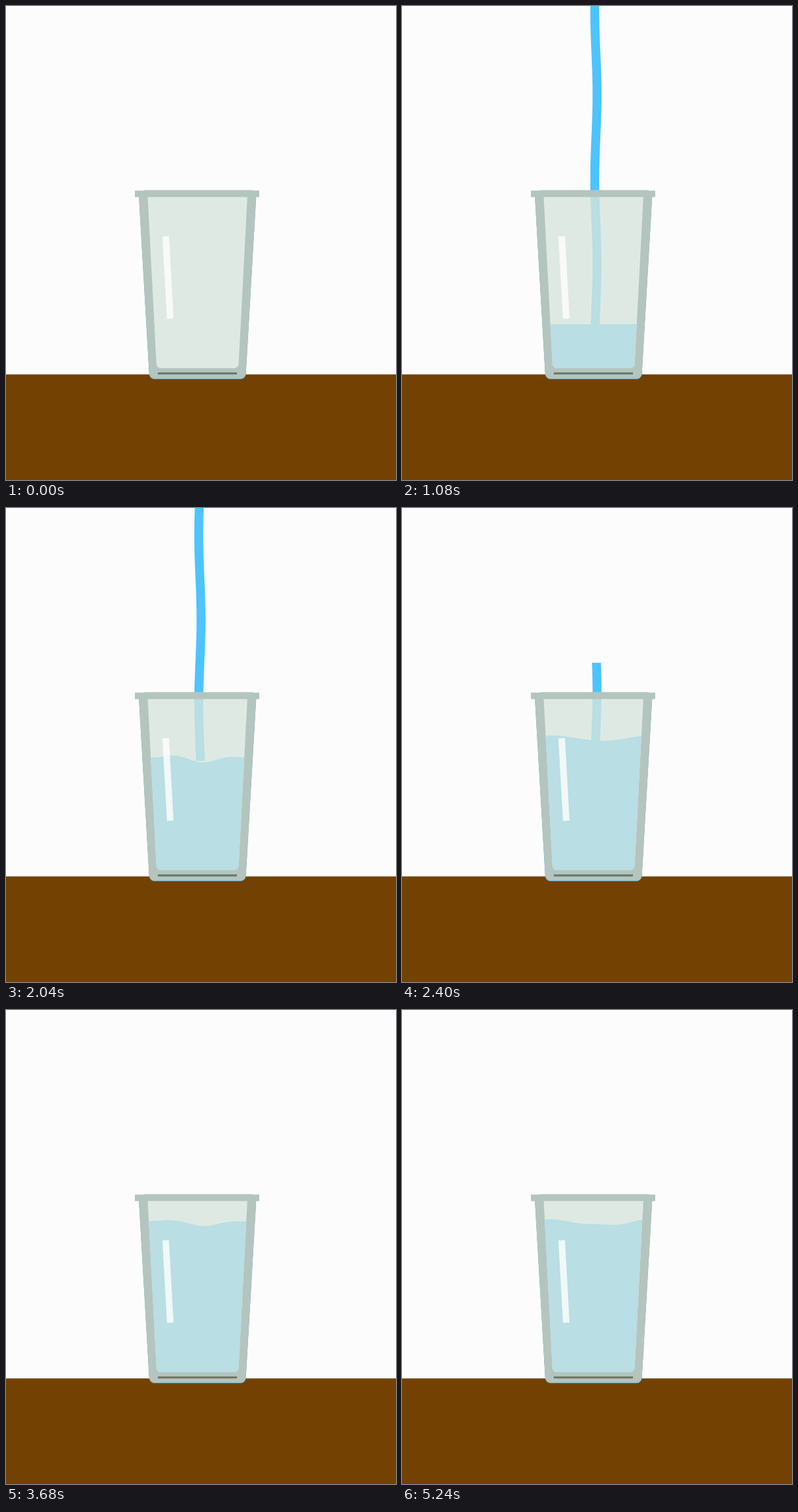
These frames come from a looping animation (596 px wide and 725 px high, 5.28 s). An HTML page with a canvas:

```html
<!DOCTYPE html>
<html lang="en">
<head>
<meta charset="utf-8">
<title>Filling a glass</title>
<style>
  html, body { margin: 0; width: 100%; height: 100%; overflow: hidden; background: #fcfcfc; }
  canvas { display: block; }
</style>
</head>
<body>
<canvas id="stage" width="596" height="725"></canvas>
<script>
const ctx = document.getElementById('stage').getContext('2d');
const { PI, cos, min, max } = Math;

const LOOP = 5280, STEP = 40, HOLD = 120;
const FALL = 142 / 120;                          // px per ms for both ends of the stream
const POUR = 80, SHUT = 2200;                    // the stream's ends leave the top edge
const LAND = 552, FULL = 2880;                   // water starts and stops rising
const FLOOR = 554, BRIM = 325;
const RIPPLE = { length: 258, speed: 0.305, swing: 1.75 };
const SLOSH = 840;                               // period of the surface
const BLUE = '#4dc3ff', WATER = '#b9dee3', WALL = '#b3c5be', CLEAR = '#dfe9e3';

const clamp = v => min(1, max(0, v));

function level(t) {
  const left = 1 - clamp((t - LAND) / (FULL - LAND));
  return BRIM + (FLOOR - BRIM) * left ** 1.35;
}

// Height offset at u, from 0 at the left wall to 1 at the right:
// one steady wave plus a standing wave of half its length
function slosh(u, t) {
  const growth = clamp((t - LAND) / 1488) ** 3;
  const beat = 0.4 + 3.2 * cos(2 * PI * (t - 3000) / SLOSH);
  return growth * (beat * cos(4 * PI * u - 0.6) - 4 * cos(2 * PI * u - 0.57));
}

function fillPath(points, color) {
  ctx.fillStyle = color;
  ctx.beginPath();
  points.forEach(([x, y]) => ctx.lineTo(x, y));
  ctx.fill();
}

function box(x, y, w, h, color) {
  ctx.fillStyle = color;
  ctx.fillRect(x, y, w, h);
}

// A tapered cup, mirrored about the glass's middle
function cup(topHalf, footHalf, bottom, r) {
  const mid = 292.7, top = 291;
  ctx.beginPath();
  ctx.moveTo(mid - topHalf, top);
  ctx.arcTo(mid - footHalf, bottom, mid + footHalf, bottom, r);
  ctx.arcTo(mid + footHalf, bottom, mid + topHalf, top, r);
  ctx.lineTo(mid + topHalf, top);
  ctx.closePath();
}

function fillCup(color, ...shape) {
  cup(...shape);
  ctx.fillStyle = color;
  ctx.fill();
}

const INNER = [76.2, 62.5, FLOOR, 7];

function stream(from, to, t, color) {
  if (to <= from) return;
  const low = 143 + RIPPLE.speed * (t - 680);
  const mid = y => 296.3 - RIPPLE.swing * cos(2 * PI * (y - low) / RIPPLE.length);
  const left = [], right = [];
  for (let y = from; y < to + 6; y += 6) {
    const end = min(y, to);
    left.push([mid(end) - 6.8, end]);
    right.unshift([mid(end) + 6.8, end]);
  }
  fillPath([...left, ...right], color);
}

function pool(t) {
  const y = level(t);
  const half = 76.2 - (y - 291) * 0.0525;
  const points = [[200, 560]];
  for (let u = -0.05; u <= 1.05; u += 0.02) {
    points.push([292.7 + half * (2 * u - 1), y + slosh(u, t)]);
  }
  points.push([386, 560]);
  fillPath(points, WATER);
}

function draw(t) {
  box(0, 0, 596, 725, '#fcfcfc');
  box(0, 563.5, 596, 161.5, '#734203');

  const pouring = t >= HOLD;
  const head = min(FALL * (t - POUR), level(t) + 4);
  const tail = max(0, FALL * (t - SHUT));
  if (pouring) stream(tail, min(head, 287), t, BLUE);

  // Glass body with a thin blue edge under the foot
  fillCup('#5f9fb5', 89.6, 73.4, 571, 8);
  fillCup(WALL, 89.6, 73.4, 570, 8);
  fillCup(CLEAR, ...INNER);

  ctx.save();
  cup(...INNER);
  ctx.clip();
  if (pouring) stream(max(tail, 287), head, t, WATER);
  if (t > LAND) pool(t);
  ctx.restore();

  box(197, 282.3, 190, 10, WALL);
  box(211, 281.6, 166, 2, WALL);
  box(232, 560.5, 121, 3, '#66746e');
  fillPath([[239, 352.6], [249, 352], [256, 478], [246, 478.6]], 'rgba(255,255,255,0.8)');
}

const start = performance.now();
function tick() {
  const t = max(0, performance.now() - start) % LOOP;
  draw(t < HOLD ? 0 : Math.floor(t / STEP) * STEP);
  requestAnimationFrame(tick);
}
tick();
</script>
</body>
</html>
```
